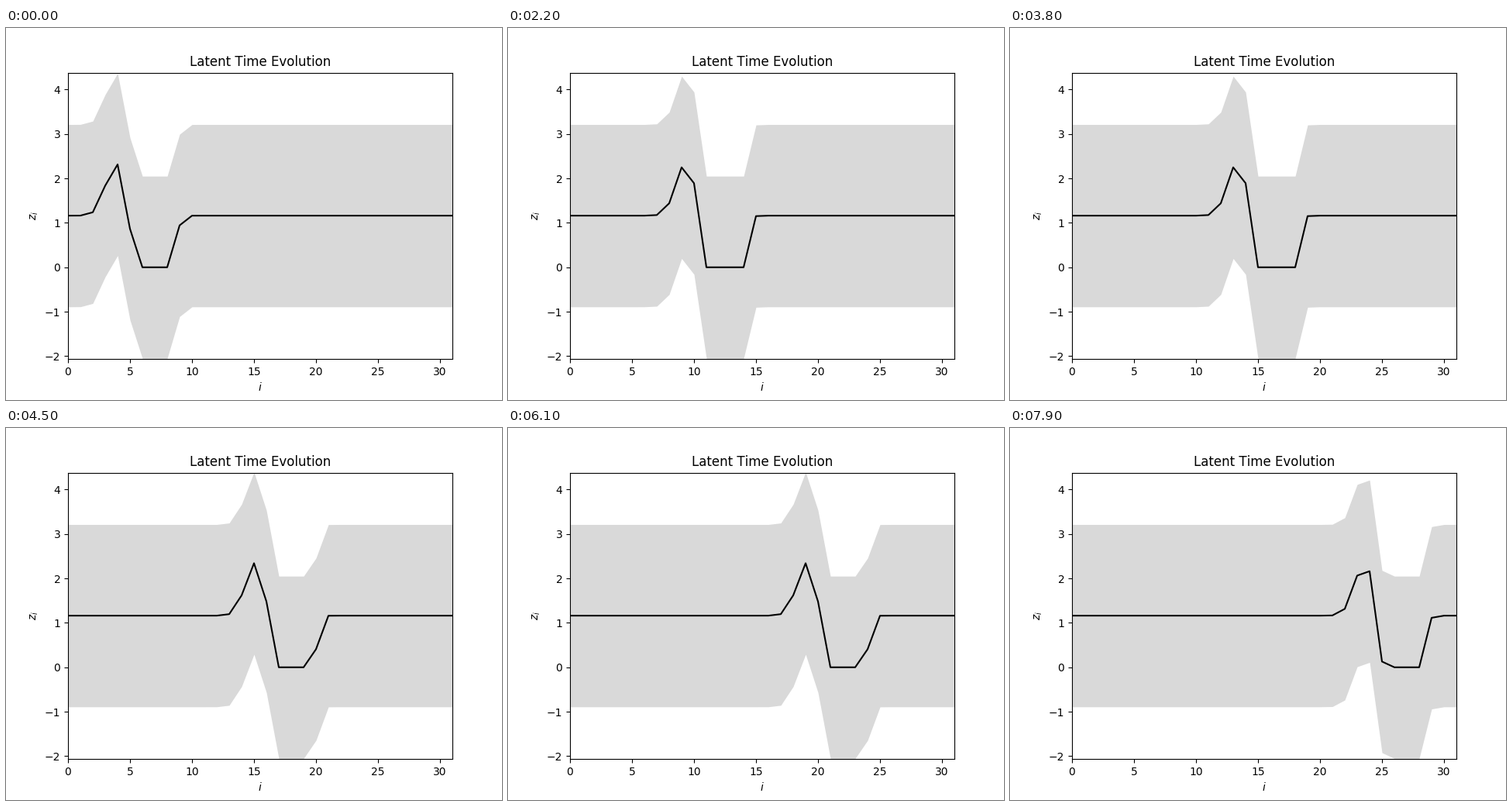
A matplotlib script for the animation above (8000 ms loop, 640 by 480 pixels).

```python
import numpy as np
import matplotlib.pyplot as plt
from matplotlib.animation import FuncAnimation

FRAMES = 80
INTERVAL = 100   # ms
SPEED = 0.25     # index units per frame
REST = 1.162     # mean level away from the pulse
BAND = 2.052     # half height of the shaded area

plt.rcParams["text.kerning_factor"] = 6

i = np.arange(32)


def sigmoid(x):
    return 1 / (1 + np.exp(-x))


def pulse(u):
    """A smooth crest followed by a trough that is cut off at zero."""
    crest = 1.19 * np.exp(-0.5 * ((u - 3.83) / 0.78) ** 2)
    trough = 2 * sigmoid(4.75 * (u - 5.138)) * sigmoid(6.4 * (8.672 - u))
    return np.maximum(0, REST + crest - trough)


def outline(mean):
    lower = np.column_stack([i, mean - BAND])
    upper = np.column_stack([i, mean + BAND])
    return np.vstack([lower, upper[::-1]])


fig, ax = plt.subplots(figsize=(6.4, 4.8), dpi=100)
ax.set_title("Latent Time Evolution")
ax.set_xlabel("$i$")
ax.set_ylabel("$z_i$")
ax.set_xlim(0, 31)
ax.set_ylim(-2.066, 4.381)

start = pulse(i)
line, = ax.plot(i, start, color="black")
area = ax.fill_between(i, start - BAND, start + BAND,
                       color="black", alpha=0.15, linewidth=0)


def update(frame):
    mean = pulse(i - SPEED * frame)
    line.set_ydata(mean)
    area.set_verts([outline(mean)])
    return line, area


anim = FuncAnimation(fig, update, frames=FRAMES, interval=INTERVAL,
                     repeat=True, repeat_delay=0)
plt.show()
```
